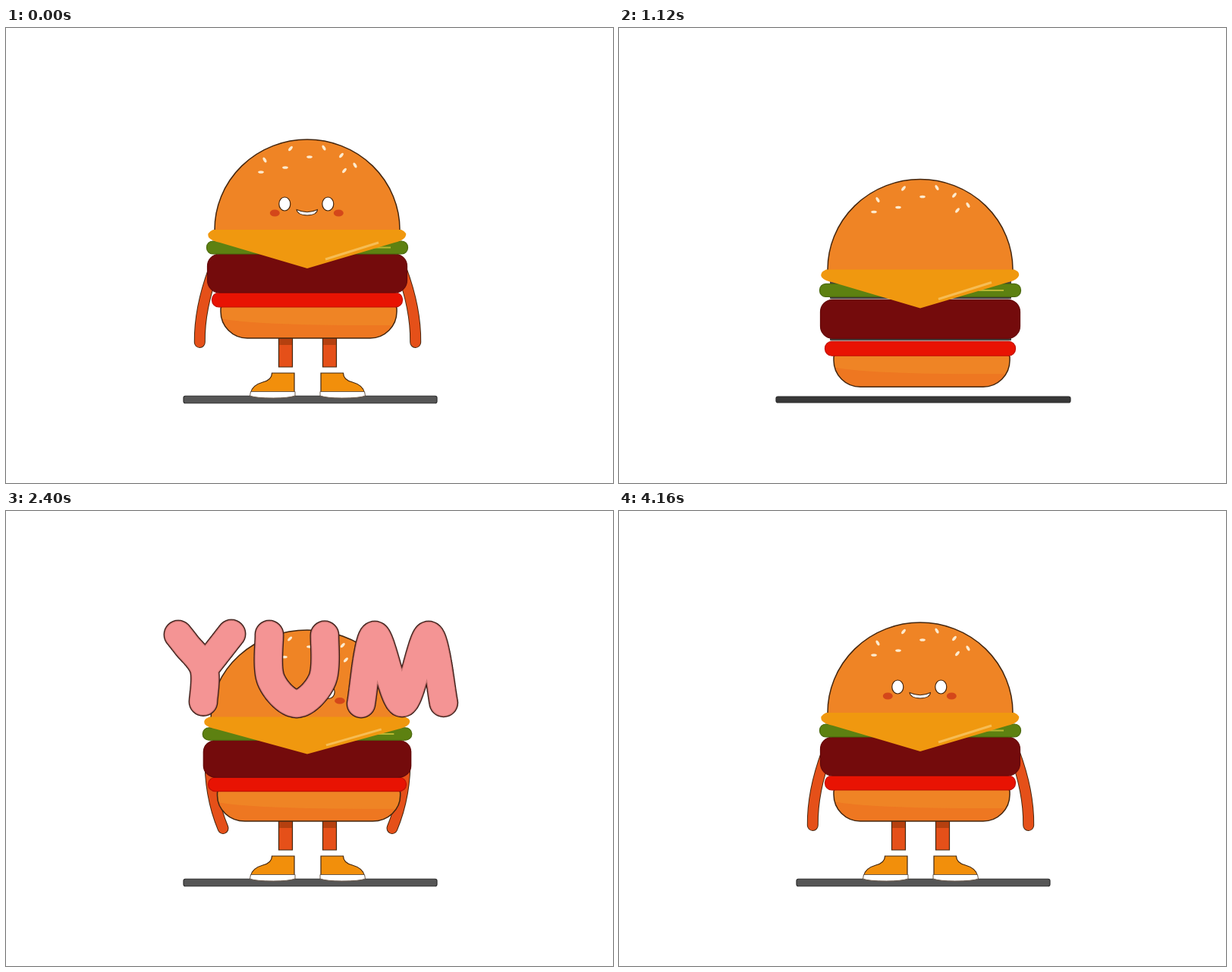
An HTML page with a canvas that plays this animation: 800x600 px, repeating every 4.2 s.

```html
<!DOCTYPE html>
<html>
<head>
<meta charset="utf-8">
<style>
html, body { margin: 0; width: 100%; height: 100%; overflow: hidden; background: #fff; }
canvas { display: block; }
</style>
</head>
<body>
<canvas id="stage" width="800" height="600"></canvas>
<script>
const c = document.getElementById('stage').getContext('2d');
const LOOP = 4200, JUMP = 1690, APEX = 1930, LAND = 2130;
const REST = 485, STAND = 409, TOP = 334, MID = 397, DARK = '#43260f';
const rad = d => d * Math.PI / 180;
const clamp = x => Math.min(1, Math.max(0, x));
const mix = (a, b, p) => a + (b - a) * p;
const smooth = p => p * p * (3 - 2 * p);

// Eased value from [time, value] keys
function key(t, ...keys) {
  const i = keys.findIndex(k => t <= k[0]);
  if (i < 1) return keys.at(i)[1];
  const [t0, a] = keys[i - 1], [t1, b] = keys[i];
  return mix(a, b, smooth((t - t0) / (t1 - t0)));
}

function at(draw, x, y, turn = 0, sx = 1, sy = sx) {
  c.save();
  c.translate(x, y);
  c.rotate(rad(turn));
  c.scale(sx, sy);
  draw();
  c.restore();
}

function shape(path, fill, line, width = 1.2) {
  const p = typeof path === 'string' ? new Path2D(path) : path;
  if (fill) { c.fillStyle = fill; c.fill(p); }
  if (line) { c.strokeStyle = line; c.lineWidth = width; c.stroke(p); }
  return p;
}

function box(x, y, w, h, r, fill, line) {
  const p = new Path2D();
  p.roundRect(x, y, w, h, r);
  return shape(p, fill, line);
}

function oval(x, y, rx, ry, fill, line, turn = 0) {
  const p = new Path2D();
  p.ellipse(x, y, rx, ry, rad(turn), 0, 7);
  shape(p, fill, line);
}

const seeds = [[375, 159], [419, 158], [400, 170], [442, 168], [341, 174], [368, 184],
  [446, 188], [460, 181], [336, 190]];

// Layers from bottom to top; tilt and width apply while falling
const layers = [
  { y: 388, tilt: 8, wide: .86, draw() {
    const bun = box(283, 367, 232, 42, [3, 3, 35, 35], '#ef8425');
    c.save();
    c.clip(bun);
    shape('M283 383Q330 393 520 392V412H283Z', '#ee7721');
    c.restore();
    shape(bun, null, DARK, 1.5);
  } },
  { y: 358, tilt: -3, wide: .86, draw() {
    box(271.5, 349, 251, 19, 9, '#e81303', '#c01005');
  } },
  { y: 323, tilt: 5, wide: .97, draw() {
    box(265.5, 298, 263, 51, 16, '#740b0c', '#640909');
  } },
  { y: 290, tilt: -5, wide: .9, draw() {
    box(264.5, 281, 265, 17, 8, '#5d8111', '#4b6a0f');
    shape('M474 289.5H507', null, '#b9b832', 2);
  } },
  { y: 250, tilt: 4, wide: .95, draw() {
    shape('M275 270V266A122 119 0 0 1 519 266V270', '#ef8425', DARK, 1.5);
    seeds.forEach(([x, y], i) => oval(x, y, 3.8, 1.8, '#fdebcf', null, [-50, 60, 0][i % 3]));
  } },
  { y: 250, tilt: 4, wide: .95, draw() {
    shape('M273 266H521Q530 270 526 276Q522 281 512 283L397 317L282 283Q271 281 267 276Q264 270 273 266Z', '#f0980f');
    shape('M421 305L491 283', null, '#f6bd55', 3);
  } }
];

function face(open) {
  for (const s of [-1, 1]) {
    oval(395.8 + s * 28.5, 232, 7.5, 9, '#fff', DARK);
    oval(396.3 + s * 42, 244, 6.5, 4.5, '#d4471a');
  }
  if (open) {
    oval(396, 251, 7.5, 5, '#d4471a');
    shape('M388 250Q388 241 396 241Q404 241 405 250Q396 247 388 250Z', '#fff', DARK, 1);
  } else {
    shape('M383 239.5Q397 246 410.5 239.5Q410 246.5 397 247Q384 246.5 383 239.5Z', '#fff', DARK, 1);
  }
}

function ground(t) {
  if (t < 420) return;
  const half = key(t, [480, 198], [1120, 194], [1720, 193], [2000, 184], [LAND, 167]);
  const h = key(t, [440, 5], [900, 8], [1720, 8], [LAND, 9.5]);
  const g = key(t, [480, 40], [1120, 56], [2000, 58], [LAND, 86]);
  box(401 - half, 490 - h / 2, half * 2, h, 2.5, `rgb(${g},${g},${g})`, '#2c2c2c');
}

function leg() {
  box(-9, 0, 18, 42, 0, '#e55019', DARK);
  box(-8.5, 0, 17, 13, 0, '#b5400f');
  shape('M-18 50H11.5V76H-46Q-44 66 -30 62Q-18 59 -18 50Z', '#f28f0b', DARK);
  shape('M-46 74.5H12.5V80Q4 83 -16 83Q-40 83 -47 80Z', '#fff', '#6b5a4c', 1);
}

function arm(angle) {
  const a = rad(angle), len = 99 - 20 * Math.sin(a) ** 2;
  const x = -Math.sin(a) * len, y = Math.cos(a) * len;
  const p = new Path2D(`M0 0Q${x / 2 - 10} ${y / 2 + 4} ${x} ${y}`);
  c.lineCap = 'round';
  shape(p, null, DARK, 15);
  shape(p, null, '#e55019', 13);
  c.lineCap = 'butt';
}

// Share of the fall a layer still has ahead
const landing = i => 640 + 60 * Math.min(i, 4);
const height = (i, t) => (landing(i) - t) / (landing(i) - 480);

// Vertical shift of a layer while the stack builds up
function drop(i, t) {
  if (t < landing(i)) return -(314 + 29.5 * i) * height(i, t);
  const hop = -12 - 4 * Math.min(3, Math.max(0, i - 1));
  return key(t, [landing(i), 0], [1110, hop], [1240, 0], [1320, -4], [1400, 0]);
}

function bodyBottom(t) {
  if (t < JUMP) return REST;
  if (t < APEX) return mix(TOP, REST, ((APEX - t) / (APEX - JUMP)) ** 2);
  return mix(TOP, STAND, Math.min(1, (t - APEX) / (LAND - APEX)) ** 2);
}

function burger(t) {
  const bottom = bodyBottom(t), since = t - LAND;
  const sx = since < 0
    ? key(t, [1560, 1], [1680, 1.1], [1800, .915], [2000, .915], [LAND, 1])
    : 1 + .2 * Math.exp(-since / 220) * Math.sin(since * .00885);
  const sy = 1 / sx;
  const grow = smooth(clamp((t - JUMP) / 90));

  if (grow > 0) {
    const kick = key(t, [1720, 0], [1860, 30], [2000, 30], [LAND, 0]);
    const swing = since < 0
      ? key(t, [1700, 11], [1860, 152], [2000, 148], [LAND, 121])
      : 11 + 110 * Math.exp(-since / 250) * Math.cos(since * .008);
    for (const side of [1, -1]) {
      at(() => {
        at(leg, -29, bottom - 4, kick, grow * (1 + kick * .002));
        at(() => arm(swing), -123.5 * sx, bottom - 91 * sy, 0, grow);
      }, 397.5, 0, 0, side, 1);
    }
  }

  at(() => {
    c.translate(-MID, -STAND);
    if (t > 950 && t < 1240) {
      for (const [i, y] of [[1, 344], [2, 293], [3, 277]]) box(278, y + drop(i, t), 239, 4, 1, '#45413f');
    }
    layers.forEach((l, i) => {
      const air = clamp(height(i, t));
      at(() => {
        c.translate(-MID, -l.y);
        l.draw();
      }, MID + 5 * air, l.y + drop(i, t), l.tilt * air, mix(1, l.wide, air), 1);
    });
    if (grow > 0) face(t > 1750 && t < 3880);
  }, MID, bottom, 0, sx, sy);
}

// Letter points: place at rest, then place and radius when swollen
const THICK = 18.5;
const fork = [261, 208, 280, 212, 32];
const letters = [
  [
    [[227, 163, 210, 150, 17], [238, 177, 230, 148, 23], fork, [260, 252, 286, 268, 47]],
    [[297, 162, 309, 142, 16], fork]
  ],
  [[[347, 163, 341, 156, 14], [349, 222, 350, 222, 14], [383, 254, 381, 262, 17],
    [417, 222, 410, 205, 34], [420, 163, 404, 141, 48]]],
  [[[468, 254, 448, 271, 17], [486, 164, 481, 165, 20], [522, 253, 508, 265, 20],
    [557, 164, 554, 172, 34], [577, 254, 595, 264, 44.5]]]
];

const spline = (a, b, d, e, u) =>
  b + .5 * u * (d - a + u * (2 * a - 5 * b + 4 * d - e + u * (3 * (b - d) + e - a)));

function samples(stroke, swell) {
  const pts = stroke.map(([x, y, x2, y2, r]) => [mix(x, x2, swell), mix(y, y2, swell), mix(THICK, r, swell)]);
  const n = pts.length - 1, out = [];
  for (let i = 0; i < n; i++) {
    const [a, b, d, e] = [-1, 0, 1, 2].map(o => pts[Math.min(n, Math.max(0, i + o))]);
    for (let u = 0; u <= 1; u += .025) out.push([0, 1, 2].map(j => spline(a[j], b[j], d[j], e[j], u)));
  }
  return out;
}

function word(t) {
  const size = key(t, [1950, 0], [2000, .098], [2220, 1.046], [2400, 1], [2960, 1],
    [3340, 1.176], [3480, 1.15], [3920, 0]);
  if (size < .01) return;
  const swell = key(t, [2400, 0], [2760, 1], [2960, 1], [3340, 1.4], [3920, 0]);
  const dx = key(t, [2960, 0], [3340, -25], [3920, -5]);
  const y = key(t, [2000, 184], [2220, 208], [2400, 208], [2680, 174], [2960, 208], [3340, 159], [3920, 245]);
  at(() => {
    c.translate(-402, -208);
    for (const letter of letters) {
      const dots = letter.flatMap(s => samples(s, swell));
      for (const [grow, color] of [[1, '#3b1d18'], [-.3, '#c97672'], [-1.4, '#f49494']]) {
        c.beginPath();
        for (const [x, y, r] of dots) {
          const q = Math.max(.5, r + grow);
          c.moveTo(x + q, y);
          c.arc(x, y, q, 0, 7);
        }
        c.fillStyle = color;
        c.fill();
      }
    }
  }, 402 + dx, y, 0, size);
}

function frame(now) {
  let t = now % LOOP;
  if (t < 40) t = LOOP - 40; // the loop opens on the standing pose
  c.clearRect(0, 0, 800, 600);
  ground(t);
  burger(t);
  word(t);
  requestAnimationFrame(frame);
}
frame(0);
</script>
</body>
</html>
```
